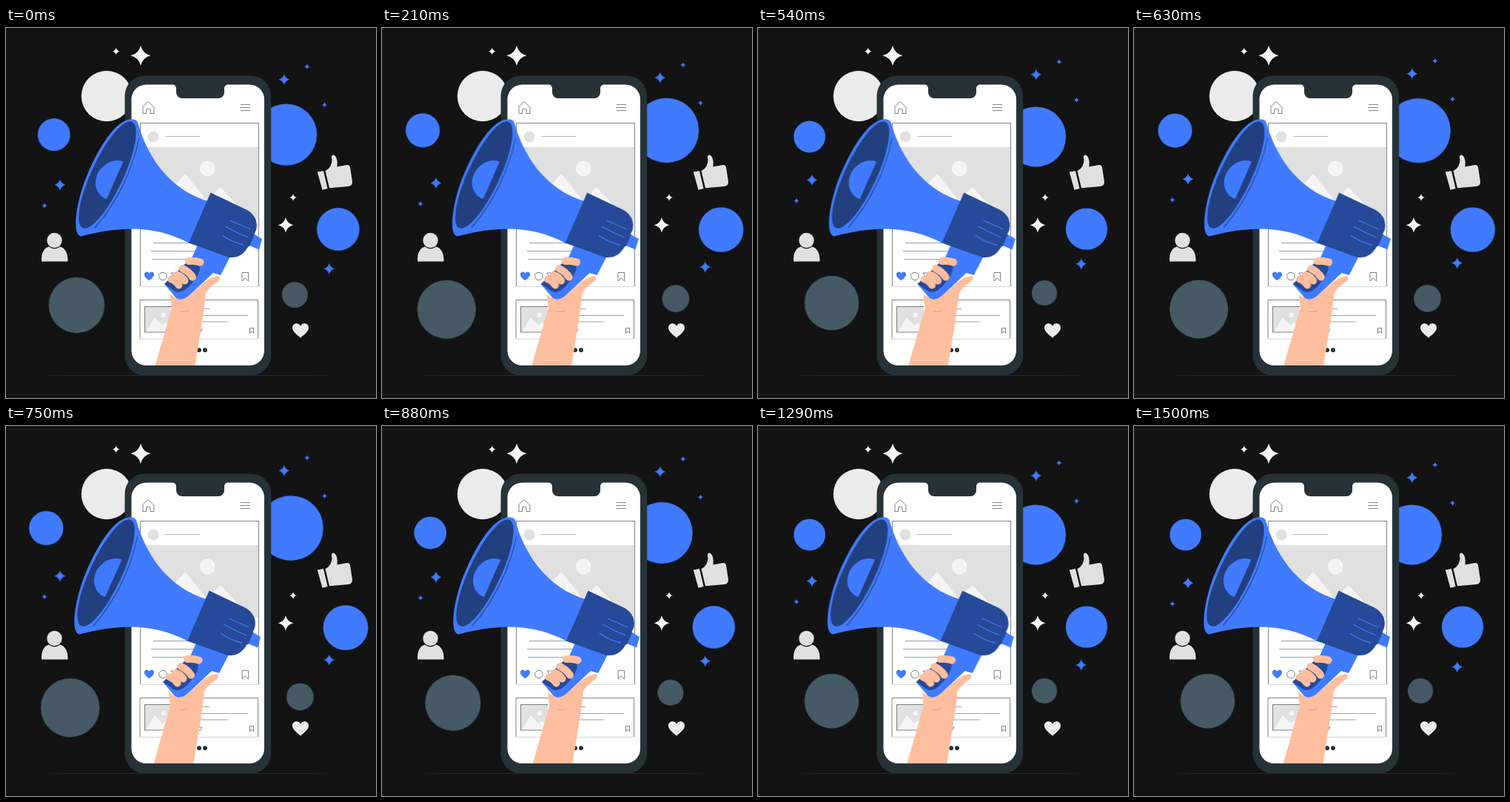
Write an HTML page that moves like this. It is 500 by 500 pixels and loops after 1.54 s.

```html
<!DOCTYPE html>
<html lang="en">
<head>
<meta charset="utf-8">
<title>Megaphone and phone</title>
<style>
  html, body { margin: 0; width: 100%; height: 100%; overflow: hidden; background: #131313; }
  svg { display: block; width: 100vw; height: 100vh; }
  .blue { fill: #407bff; }
  .navy { fill: #264a99; }
  .slate { fill: #455a64; }
  .pale { fill: #e0e0e0; }
  .light { fill: #f5f5f5; }
  .skin { fill: #ffbe9d; }
  .line { fill: none; stroke: #263238; stroke-width: .6; }
  .faint { stroke: #b8bcbe; }
  .soft { fill: none; stroke: #90a4ae; stroke-width: 1; }
  .finger { fill: none; stroke: #ffbe9d; stroke-width: 10; stroke-linecap: round; }
  #badges { transform-origin: 259px 259px; }
</style>
</head>
<body>
<svg viewBox="0 0 500 500">
  <defs>
    <path id="star" d="M0-1Q.2-.2 1 0 .2.2 0 1-.2.2-1 0-.2-.2 0-1Z"/>
    <path id="heart" d="M0 10C-4 6-11 2-11-4-11-10-3-12 0-6 3-12 11-10 11-4 11 2 4 6 0 10Z"/>
    <clipPath id="above"><path d="M0 0H500V456H0Z"/></clipPath>
    <linearGradient id="fade">
      <stop offset="0" stop-color="#263238" stop-opacity="0"/>
      <stop offset=".1" stop-color="#263238"/>
      <stop offset=".9" stop-color="#263238"/>
      <stop offset="1" stop-color="#263238" stop-opacity="0"/>
    </linearGradient>
  </defs>

  <rect x="45" y="469" width="402" height=".8" fill="url(#fade)"/>
  <g id="still" class="light"></g>
  <g id="floaters" class="blue"></g>

  <circle cx="136" cy="92" r="34.2" fill="#ebebeb"/>
  <g id="badges">
    <circle class="blue" cx="69.6" cy="147" r="21.4"/>
    <circle class="blue" cx="375.5" cy="147" r="40.6"/>
    <circle class="blue" cx="444" cy="271.6" r="28.1"/>
    <circle class="slate" cx="99.5" cy="371.6" r="36.8"/>
    <circle class="slate" cx="387" cy="358" r="17.1"/>
  </g>

  <g class="pale">
    <circle cx="65.5" cy="287" r="10.2"/>
    <path d="M48 315.5C47.5 303 52 297 58 295.5Q65.500 301 73 295.500C79 297 84 303 83.500 315.500Z"/>
    <path d="M420.800 194.500 429 193 434.600 217 427.500 218.800Z"/>
    <path d="M431.500 193 435.500 190.500Q442 184 440 174 440 171 443 171.500 449 175 447.400 187.500L461 185Q464.500 185 465.200 189L468 208Q468 213 463 214L437 216.300Z"/>
    <use href="#heart" fill="#ebebeb" transform="translate(398 408.800)"/>
  </g>

  <rect x="160.500" y="64.500" width="197.700" height="405" rx="27" fill="#263238"/>
  <path fill="#fff" d="M189.500 76.500H225A5 5 0 0 1 230 81.500V87A8 8 0 0 0 238 95H287A8 8 0 0 0 295 87V81.500A5 5 0 0 1 300 76.500H329A20 20 0 0 1 349 96.500V436A20 20 0 0 1 329 456H189.500A20 20 0 0 1 169.500 436V96.500A20 20 0 0 1 189.500 76.500Z"/>

  <g class="line">
    <path d="M184 107 191.500 99.500 200 107V115.500H195V110Q192 108 189.500 110V115.500H185V107"/>
    <path d="M317 103.500H330M316 107.500H330M317 111.500H330"/>
    <path d="M181.500 349V128.500H341.500V349"/>
    <path d="M181 420V367.500H340.500V420"/>
    <path class="faint" d="M181.500 349.500H341.500M181 420.500H340.500"/>
    <path d="M215 146.500H262" stroke="#888"/>
    <circle cx="212" cy="335.500" r="5.300"/>
    <path d="M223 331H234L229 340ZM319 330.500H327.500V342L323.200 337.800 319 342Z"/>
    <path d="M258 407H265L262 412ZM329.500 405.500H334.500V412.500L332 410 329.500 412.500Z"/>
  </g>
  <circle class="pale" cx="199" cy="147" r="7.500"/>
  <path class="pale" d="M182 161H341V259H182Z"/>
  <g class="light">
    <circle cx="272.300" cy="190" r="10.500"/>
    <path d="M190 259 240 199Q242 197 244 199L271 233 288 217Q290 215 292 217L330 259Z"/>
  </g>
  <path class="soft" d="M199 290.500H262M196 301.500H262M197 312.500H250"/>
  <use href="#heart" class="blue" transform="translate(193.500 335.300) scale(.6)"/>
  <path class="pale" d="M187.500 376.500H224V411H187.500Z"/>
  <path class="light" d="M189 411 201 391 211 402 216 398 224 406V411Z"/>
  <circle class="light" cx="213" cy="388" r="3.200"/>
  <path class="line" d="M224 376.500H187.500V411H216" stroke-width="1"/>
  <path class="soft" d="M250 379.500H275M250 388.500H327M250 397H300"/>
  <circle cx="261" cy="435.300" r="3" fill="#263238"/>
  <circle cx="269" cy="435.300" r="3" fill="#263238"/>

  <g clip-path="url(#above)">
    <g id="horn">
      <path class="blue" d="M259 293 303 309 290 334 280 331 247 362Q237 370 230 365L214 346 250 313Z"/>
      <path class="navy" d="M250 311 262 323Q262 332 252 344 238 361 229 356L214 346Z"/>
      <path class="blue" d="M331 276 346 285 342 299.500 324 292Z"/>
      <path class="navy" d="M331 274 336 279 329 295 324 296Z"/>
      <path class="blue" d="M101 281.500C91 279 93 250 102 220C113 184 140 132 163 124.500Q174 121 178 127C188 166 217 219 276 235L248 291C205 268 160 266 101 281.500Z"/>
      <ellipse cx="137" cy="198.500" rx="21.500" ry="79" transform="rotate(25 137 198.500)" fill="#223f7f"/>
      <path class="blue" d="M158.500 180.500 136 231C120 226 116 205 128 190Q142 175 158.500 180.500Z"/>
      <path d="M179.500 149C172 190 149 238 120 270" fill="none" stroke="#264a99" stroke-width="1.200"/>
      <path class="navy" d="M276.500 222.500 326 246Q342 256 338 273L327 296Q317 313 300 309.500L247 290.500Z"/>
      <path d="M303 260 330 272M296 268Q312 277 327 283M292 280Q306 290 321 293" fill="none" stroke="#407bff" stroke-width="1.300"/>
      <path class="skin" d="M200 462Q220 392 224 379L222 360 230 365Q237 370 247 362L270 342Q278 336 287 335 291 337 287 342 275 350 270 358 268 380 264 403L254.500 462Z"/>
      <path class="finger" d="M247 315Q255 314 262.500 316.500M238.500 325Q247 329 252 336.500M231 333.500Q238 336 241.500 341.500M223.500 339.500Q229 341 233.500 347.500"/>
      <path d="M236 383.500Q242 384 248 382" fill="none" stroke="#eb996e" stroke-width=".8"/>
    </g>
  </g>
</svg>
<script>
  const LOOP = 1540;
  const $ = id => document.getElementById(id);

  const stars = (id, list) => {
    $(id).innerHTML = list.map(([x, y, r]) =>
      `<use href="#star" transform="translate(${x} ${y}) scale(${r})"/>`).join('');
  };
  stars('still', [[182, 37.3, 13.6], [148.8, 31.5, 4.8], [378, 266.2, 10.2], [388, 229, 4.8]]);
  stars('floaters', [[73, 212.2, 7.6], [52, 240.3, 3.5], [375.8, 69.8, 7.6],
    [406.8, 52.6, 3.5], [430.5, 104, 3.5], [436.7, 325.6, 7.6]]);

  // steps: [time in ms, value]
  const play = (id, fn, easing, steps) => $(id).animate(
    steps.map(([ms, v]) => ({ offset: ms / LOOP, transform: fn(v), easing })),
    { duration: LOOP, iterations: Infinity });

  play('badges', s => `scale(${s})`, 'ease',
    [[0, 1.015], [140, 1.1], [555, 1], [705, 1.092], [1095, 1], [LOOP, 1]]);

  play('floaters', y => `translateY(${y}px)`, 'linear',
    [[0, 0], [755, -9.5], [1500, 0], [LOOP, 0]]);

  const shake = [-.5, 1, -2, 2, -2, 2, -2, 1, -.5, 0];
  play('horn', x => `translateX(${x}px)`, 'ease',
    [[0, 0], ...shake.map((x, i) => [148 + 150 * i, x]), [LOOP, 0]]);
</script>
</body>
</html>
```
